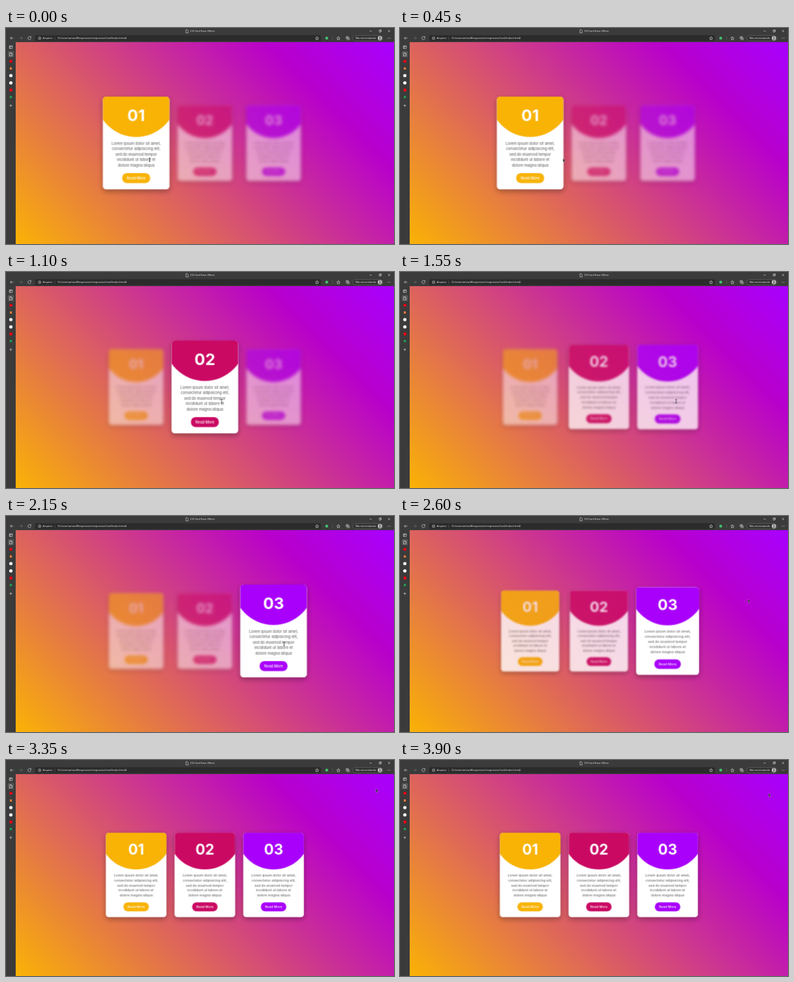
An HTML page that plays this animation: 600 px wide and 336 px high, repeating every 3950 ms.

```html
<!DOCTYPE html>
<html lang="pt">
<head>
<meta charset="utf-8">
<title>CSS Card Hover Effects</title>
<style>
  html, body { margin: 0; width: 100%; height: 100%; overflow: hidden; background: #3b3b3b; }
  body { position: relative; --loop: 3950ms; }

  .page {
    position: absolute; left: 15px; top: 22px; width: 585px; height: 314px; overflow: hidden;
    background: linear-gradient(45deg, #fab205, #b800cc 78%, #a800ff);
  }
  /* Cards are laid out at desktop size, then scaled to the stage. */
  .deck {
    position: absolute; width: 1872px; height: 1004.8px;
    display: flex; justify-content: center; align-items: center; gap: 40px;
    transform: scale(.3125); transform-origin: 0 0;
    font-family: Inter, sans-serif; font-feature-settings: "cv11"; text-align: center;
  }
  .card {
    position: relative; width: 300px; height: 420px; border-radius: 15px; overflow: hidden;
    background: #fff; box-shadow: 0 10px 26px rgba(0, 0, 0, .32);
    animation: var(--loop) ease infinite;
  }
  .card::before {
    content: ""; position: absolute; inset: 0;
    background: var(--tint); clip-path: circle(50% at 50% 0);
  }
  .card > * { position: absolute; left: 0; width: 100%; margin: 0; }
  h2 { top: 48px; font-size: 72px; line-height: 72px; font-weight: 700; color: #fff; }
  p { top: 199px; font-size: 16.8px; line-height: 25px; color: #555; white-space: pre; }
  .card > b {
    left: 87px; top: 346px; width: 126px; height: 45px; border-radius: 22px;
    background: var(--tint); color: #fff; font-size: 16.5px; line-height: 45px; font-weight: 500;
  }
  .one   { --tint: #f8b305; animation-name: one; }
  .two   { --tint: #ca0963; animation-name: two; }
  .three { --tint: #a900fb; animation-name: three; }

  @keyframes one {
    0%, 12.03%     { transform: scale(1.1); filter: blur(0); opacity: 1; }
    24.68%, 61.39% { transform: scale(.9); filter: blur(10px); opacity: .5; }
    74.05%, 100%   { transform: scale(1); filter: blur(0); opacity: 1; }
  }
  @keyframes two {
    0%, 12.03%     { transform: scale(.9); filter: blur(10px); opacity: .5; }
    24.68%, 35.44% { transform: scale(1.1); filter: blur(0); opacity: 1; }
    48.1%, 61.39%  { transform: scale(.9); filter: blur(10px); opacity: .5; }
    74.05%, 100%   { transform: scale(1); filter: blur(0); opacity: 1; }
  }
  @keyframes three {
    0%, 35.44%    { transform: scale(.9); filter: blur(10px); opacity: .5; }
    48.1%, 61.39% { transform: scale(1.1); filter: blur(0); opacity: 1; }
    74.05%, 100%  { transform: scale(1); filter: blur(0); opacity: 1; }
  }

  svg { position: absolute; left: 0; top: 0; width: 600px; height: 336px; }
  text { font-family: "Open Sans", sans-serif; fill: #f2f2f2; }
  .line { fill: none; stroke: #e4e4e4; stroke-width: .6; }
  .pointer { animation: travel var(--loop) linear infinite; }
  .beam { animation: beam var(--loop) step-end infinite; }
  .arrow { animation: arrow var(--loop) step-end infinite; }

  @keyframes travel {
    0%     { transform: translate(222px, 205px); }
    8.9%   { transform: translate(228px, 204px); }
    12.03% { transform: translate(258px, 203px); }
    16.46% { transform: translate(332px, 201px); }
    31.6%  { transform: translate(334px, 201px); }
    35.44% { transform: translate(365px, 201px); }
    39.24% { transform: translate(427px, 201px); }
    54.43% { transform: translate(430px, 199px); }
    58.2%  { transform: translate(433px, 197px); }
    61.39% { transform: translate(466px, 183px); }
    65.82% { transform: translate(538px, 130px); }
    73.4%  { transform: translate(567px, 60px); }
    84.8%  { transform: translate(572px, 45px); }
    98.73%, 100% { transform: translate(570px, 52px); }
  }
  @keyframes beam {
    0%, 14.2%, 37.5% { opacity: 1; }
    11%, 34%, 60.5%, 100% { opacity: 0; }
  }
  @keyframes arrow {
    0%, 14.2%, 37.5% { opacity: 0; }
    11%, 34%, 60.5%, 100% { opacity: 1; }
  }
</style>
</head>
<body>
<div class="page"><div class="deck"></div></div>

<svg viewBox="0 0 600 336">
  <path fill="#3b3b3b" d="M0 0H600V22H15V336H0Z"/>

  <!-- title bar -->
  <path class="line" d="M278.3 2.6h2l1.4 1.4v3.6h-3.4zM562.3 4.8h3.4M576.9 3.7h2.6v2.6h-2.6zM577.7 3.7v-.8h2.6v2.6h-.8M590.8 3l3.2 3.2M594 3l-3.2 3.2"/>
  <text x="285" y="6.3" font-size="3.57">CSS Card Hover Effects</text>

  <!-- toolbar -->
  <path class="line" d="M11.5 15.8H6.6M8.8 13.6L6.6 15.8l2.2 2.2"/>
  <path class="line" style="stroke:#777" d="M20.6 15.8h4.9M23.3 13.6l2.2 2.2-2.2 2.2"/>
  <path class="line" d="M38.3 14.5a2.4 2.4 0 1 0 .3 1.7M38.6 13v1.7h-1.7"/>
  <rect x="45" y="11.2" width="442" height="9.4" rx="1.5" fill="#2b2b2b"/>
  <circle class="line" cx="52" cy="15.9" r="2"/>
  <path class="line" d="M52 15.6v1.4M52 14.5v.5"/>
  <text x="57" y="17.3" font-size="4.1">Arquivo</text>
  <path d="M75.5 13.5v5M505 13v6" stroke="#666" stroke-width=".5"/>
  <text x="80" y="17.3" font-size="4.07">D:/sistema/cardResponsivo/responsiveCard/index.html#</text>
  <path id="star" class="line" d="M481 13.4l.8 1.7 1.8.2-1.3 1.3.3 1.8-1.6-.9-1.6.9.3-1.8-1.3-1.3 1.8-.2z"/>
  <use href="#star" x="33"/>
  <circle cx="496" cy="15.8" r="2.3" fill="#45bd70"/>
  <path class="line" d="M526 13.4h3.4v3.4H526zM527.3 18.2h3.5v-3.5M527.7 14.2v1.8M526.8 15.1h1.8"/>
  <rect x="536.2" y="11.6" width="46.6" height="8.6" rx="4.3" fill="#333" stroke="#777" stroke-width=".5"/>
  <text x="540.5" y="17.2" font-size="3.62">Não sincronizando</text>
  <circle cx="578.2" cy="15.9" r="3.3" fill="#c9c9c9"/>
  <path fill="#666" d="M576.2 18q0-1.7 2-1.7t2 1.7zM577 14.8a1.2 1.2 0 1 0 2.4 0a1.2 1.2 0 1 0-2.4 0z"/>
  <path d="M590.3 15.9h4.4" stroke="#e4e4e4" stroke-width=".8" stroke-dasharray=".8 1"/>

  <!-- side tabs -->
  <rect x="2.8" y="36" width="9.4" height="9.6" rx="1" fill="#555"/>
  <path class="line" d="M5.2 27.8h4.6v4.2H5.2zM5.2 28.7h4.6M6.6 28.7V32M5.7 38.5h2.2l1.5 1.5v3.4H5.7zM7.9 38.5V40h1.5"/>
  <g>
    <circle cx="7.5" cy="51.8" r="2.4" fill="#f00014"/>
    <circle cx="7.5" cy="63" r="1.9" fill="#e77a3d"/>
    <circle cx="7.5" cy="74" r="2.6" fill="#eee"/>
    <circle cx="7.5" cy="85.3" r="2.6" fill="#f4f4f4"/>
    <circle cx="7.5" cy="96.5" r="2.4" fill="#f00014"/>
    <circle cx="7.5" cy="107.4" r="1.9" fill="#22a052"/>
  </g>
  <path class="line" d="M5.3 120.6h4.2M7.4 118.5v4.2"/>

  <g class="pointer">
    <path class="beam" fill="none" stroke="#222" stroke-width=".7" d="M-1.2-2.8H1.2M0-2.8V2.8M-1.2 2.8H1.2"/>
    <path class="arrow" fill="#151515" stroke="#ccc" stroke-width=".35" d="M0 0V4.9l1.1-1 .8 1.8.8-.4-.8-1.7H3.4z"/>
  </g>
</svg>

<script>
  const blurb = ["Lorem ipsum dolor sit amet,", "consectetur adipisicing elit,",
    "sed do eiusmod tempor", "incididunt ut labore et", "dolore magna aliqua"].join("\n");
  document.querySelector(".deck").innerHTML = ["one", "two", "three"].map((name, i) =>
    `<div class="card ${name}"><h2>0${i + 1}</h2><p>${blurb}</p><b>Read More</b></div>`).join("");
</script>
</body>
</html>
```
